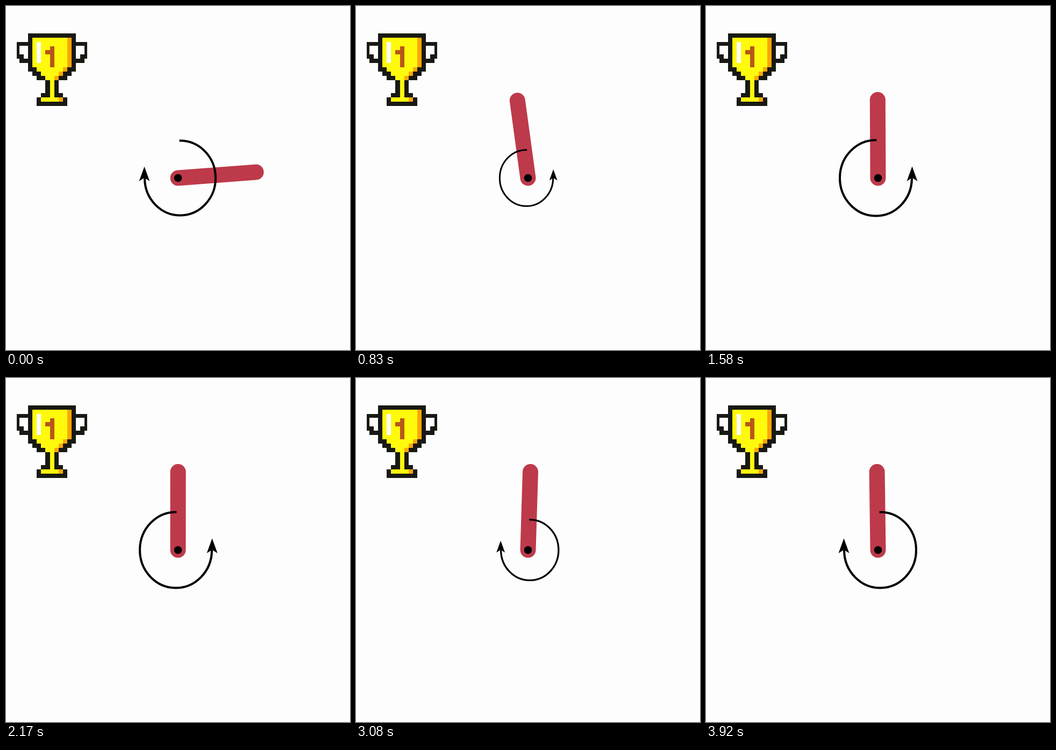
Animation of 640 by 640 pixels, one loop 4010 ms. Source, as an HTML page with a canvas:

```html
<!DOCTYPE html>
<html lang="en">
<head>
<meta charset="utf-8">
<title>Pendulum</title>
<style>
html, body { margin: 0; width: 100%; height: 100%; overflow: hidden; background: #fdfdfd; }
canvas { display: block; }
</style>
</head>
<body>
<canvas id="stage" width="640" height="640"></canvas>
<script>
const ctx = document.getElementById('stage').getContext('2d');
const LOOP = 4010, STEP = 1000 / 12, LAST = 47, HELD = 26;
const CATCH = 5, BALANCE = 10; // steps where braking and balancing begin
const C = 320, ROD = 145.5, THICK = 29;
const RAD = Math.PI / 180;
const PAPER = '#fdfdfd', INK = '#000', RED = '#bd3a4a';
const DARK = '#191914', YELLOW = '#fffa0c', ORANGE = '#fca608', BROWN = '#b8561a';

const clamp = u => Math.max(-1, Math.min(1, u));

function box(x, y, w, h, color) {
  ctx.fillStyle = color;
  ctx.fillRect(x, y, w, h);
}

// Trophy cells, counted from the top left of the bowl
function cells(col, row, w, h, color) {
  const x = c => Math.round(41 + c * 8.1);
  const y = r => Math.round(50.6 + r * 7.97);
  box(x(col), y(row), x(col + w) - x(col), y(row + h) - y(row), color);
}

function drawHandle() {
  box(20, 67, 21, 7, DARK);
  box(20, 74, 5, 24, DARK);
  box(25, 90, 8, 16, DARK);
  box(33, 98, 8, 8, DARK);
}

function drawTrophy() {
  for (let r = 0; r < 11; r++) {
    const edge = Math.max(0, r - 8), inner = 1 + Math.max(0, r - 7);
    cells(edge, r, 11 - 2 * edge, 1, DARK);
    if (r === 0) continue;
    cells(inner, r, 10 - 2 * inner, 1, YELLOW);
    cells(10 - inner, r, 1, 1, ORANGE);
  }
  cells(2, 2, 1, 5, PAPER);
  cells(5, 3, 1, 5, BROWN);
  cells(4, 4, 1, 1, BROWN);

  cells(4, 11, 3, 3, DARK);
  cells(3, 14, 5, 1, DARK);
  cells(2, 15, 7, 2, DARK);
  cells(5, 11, 1, 4, YELLOW);
  cells(3, 15, 4, 1, YELLOW);
  cells(7, 15, 1, 1, ORANGE);

  drawHandle();
  ctx.save();
  ctx.translate(171, 0);
  ctx.scale(-1, 1);
  drawHandle();
  ctx.restore();
}

// Driven pendulum; angles run clockwise from upright
function swing(i) {
  const dt = 0.05;
  let a = 85.7 * RAD, v = 0.06;
  for (let s = Math.floor(2.5 * i); s > 0; s--) {
    v += (15 * Math.sin(a) + 6) * dt;
    a += v * dt;
  }
  return a;
}

// Angle still missing to upright while the rod slows down
function settle(i) {
  return 4 * Math.atan(Math.tan(22.2 * RAD) * Math.exp(-0.497 * (i - CATCH)));
}

function sway(i) {
  const grow = Math.max(0, i - BALANCE) / 27;
  return 1.8 * RAD * grow * grow * Math.sin(2 * Math.PI * (i - 25.6) / 40);
}

function angleAt(i) {
  return i < CATCH ? swing(i) : sway(i) - settle(i);
}

function torqueAt(i) {
  if (i <= CATCH) return 0.985;
  if (i <= BALANCE) return -clamp(settle(i) / (10.5 * RAD));
  return clamp(2.7 * Math.sin(1.9075 * (i - 19) - 2.618));
}

function drawRod(a) {
  ctx.strokeStyle = RED;
  ctx.lineWidth = THICK;
  ctx.lineCap = 'round';
  ctx.beginPath();
  ctx.moveTo(C, C);
  ctx.lineTo(C + ROD * Math.sin(a), C - ROD * Math.cos(a));
  ctx.stroke();
}

function drawAxle() {
  ctx.fillStyle = INK;
  ctx.beginPath();
  ctx.arc(C, C, 7.3, 0, 2 * Math.PI);
  ctx.fill();
}

// The sign of the torque mirrors the arrow, its size scales it
function drawArrow(u) {
  ctx.save();
  ctx.translate(C, C);
  ctx.scale(u, Math.abs(u));
  ctx.strokeStyle = ctx.fillStyle = INK;
  ctx.lineWidth = 4.1;
  ctx.lineCap = 'butt';
  ctx.beginPath();
  ctx.ellipse(4, 0, 67, 70.5, 0, -Math.PI / 2 - 0.02, Math.PI);
  ctx.stroke();
  ctx.beginPath();
  ctx.moveTo(-63.5, -21.5);
  ctx.lineTo(-53.5, 6);
  ctx.lineTo(-63.5, -0.5);
  ctx.lineTo(-73.5, 6);
  ctx.fill();
  ctx.restore();
}

function draw(t) {
  let i = Math.min(LAST, Math.floor((t % LOOP + 5) / STEP));
  if (i === HELD + 1) i = HELD; // this pose stays twice as long
  box(0, 0, 640, 640, PAPER);
  drawTrophy();
  drawRod(angleAt(i));
  drawAxle();
  drawArrow(torqueAt(i));
}

const start = performance.now();
function tick() {
  draw(performance.now() - start);
  requestAnimationFrame(tick);
}
tick();
</script>
</body>
</html>
```
